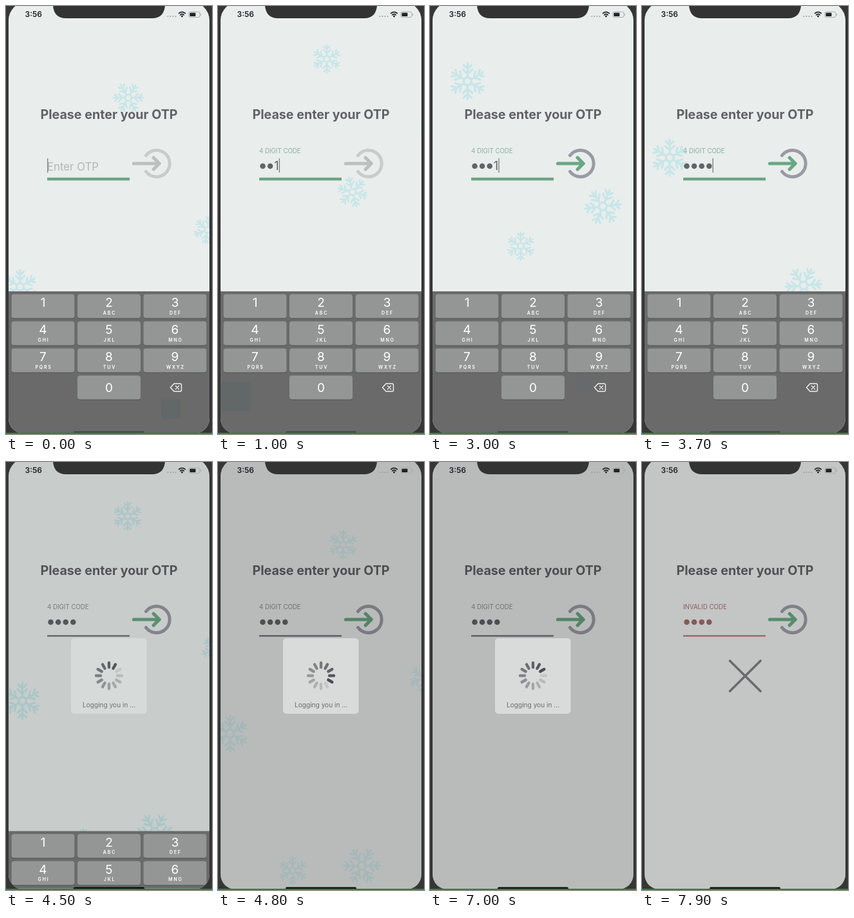
Animation of 320x663 px, one loop 8 s. Source, as an HTML page:

```html
<!DOCTYPE html>
<html lang="en">
<head>
<meta charset="utf-8">
<title>OTP login</title>
<style>
  html, body { margin: 0; width: 100%; height: 100%; overflow: hidden; background: #363636; }
  svg { display: block; width: 320px; height: 663px; }
  text { font-family: Inter, Roboto, sans-serif; }
  .mid { text-anchor: middle; }
  .line { fill: none; stroke-linecap: round; stroke-linejoin: round; }
</style>
</head>
<body>
<svg viewBox="0 0 320 663">
  <defs>
    <clipPath id="screen">
      <path d="M4 22A28 28 0 0 1 32 -6H288A28 28 0 0 1 316 22V639A23 23 0 0 1 293 662H27A23 23 0 0 1 4 639Z"/>
    </clipPath>
    <g id="arm"><path d="M0-5V-23M-5-21L0-16L5-21M-6-15L0-9.5L6-15"/></g>
    <g id="flake" class="line" stroke="#c7e6e8" stroke-width="2.7"></g>
  </defs>
  <rect width="320" height="663" fill="#363636"/>
  <g clip-path="url(#screen)">
    <rect y="-6" width="320" height="669" fill="#e9edec"/>
    <g id="flakes"></g>

    <text class="mid" x="160" y="175" font-size="19.7" font-weight="700" fill="#606163">Please enter your OTP</text>
    <text id="label" x="64"></text>
    <rect id="underline" x="64" width="128"/>
    <g id="dots"></g>
    <text id="digit" y="254" font-size="18" fill="#626365">1</text>
    <rect id="cursor" y="236" width="1.4" height="22" fill="#7d8583"/>
    <g class="line">
      <path id="ring" d="M217.5 231.5A20.5 20.5 0 1 1 217.5 256.5" stroke-width="5"/>
      <path id="arrow" d="M198.5 244H238M229.2 235L238.2 244L229.2 253" stroke-width="5.2"/>
    </g>

    <rect id="dim" width="320" height="663"/>
    <g id="panel">
      <rect x="101" y="273" width="117.5" height="117" rx="5" fill="#d8dbda"/>
      <g id="spinner" class="line" stroke="#4b4e50" stroke-width="4.4"></g>
      <text class="mid" x="160" y="379.5" font-size="10.15" fill="#6a6d6e">Logging you in ...</text>
    </g>
    <path id="cross" class="line" d="M136.5 308L184 355M184 308L136.5 355" stroke="#686b6c" stroke-width="3.6"/>

    <g id="keyboard">
      <rect y="442" width="320" height="226" fill="#6a6a6b"/>
      <g id="shadows"></g>
      <g id="keys"></g>
      <g class="line" stroke="#f2f2f2" stroke-width="1.4">
        <path d="M255.5 591L261 585H270.5Q272.5 585 272.5 587V595Q272.5 597 270.5 597H261Z"/>
        <path d="M263.5 588.5L268.5 593.5M268.5 588.5L263.5 593.5"/>
      </g>
    </g>
    <rect id="home" x="105" y="658.5" width="110" height="5" rx="2"/>

    <g fill="#202224">
      <text x="29.5" y="17" font-size="12" font-weight="600">3:56</text>
      <g fill="#9b9e9e">
        <circle cx="251.5" cy="16" r="1"/><circle cx="255.5" cy="16" r="1"/>
        <circle cx="259.5" cy="16" r="1"/><circle cx="263.5" cy="16" r="1"/>
      </g>
      <g class="line" stroke="#202224" stroke-width="1.7">
        <path d="M268.5 11.3Q273.5 7.3 278.5 11.3M270.7 13.8Q273.5 11.5 276.3 13.8"/>
      </g>
      <circle cx="273.5" cy="16" r="1.4"/>
      <rect x="284" y="9" width="17" height="8.5" rx="2.3" fill="none" stroke="#a9acac"/>
      <path d="M302.5 11.8V14.8" stroke="#a9acac"/>
      <rect x="285.5" y="10.5" width="9" height="5.5" rx="1"/>
    </g>
  </g>
  <path d="M73 0Q75 19 93 19H227Q245 19 247 0Z" fill="#333"/>
  <rect y="661" width="320" height="2" fill="#1f8f21"/>
</svg>
<script>
const LOOP = 8000, STEP = 100;
const SVG = "http://www.w3.org/2000/svg";
const $ = id => document.getElementById(id);

function set(el, attrs) {
  for (const name in attrs) el.setAttribute(name, attrs[name]);
  return el;
}
function add(parent, tag, attrs, text) {
  const el = set(document.createElementNS(SVG, tag), attrs);
  if (text) el.textContent = text;
  return parent.appendChild(el);
}
const ramp = (v, from, to) => Math.max(0, Math.min(1, (v - from) / (to - from)));
const mix = (a, b, k) => a + (b - a) * k;
const smooth = k => k * k * (3 - 2 * k);

// Flakes: time, x, y, px/s across and down, radius, angle, degrees/s
const FLAKES = [
  [0, 190, 142, 19, 146, 24, 30, 15],
  [0, 313, 347, 2, 150, 22, 10, 8],
  [0, 22, 435, 6, 170, 27, 0, 4],
  [0, 256, 624, 0, 165, 18, 0, 0],
  [1000, 169, 82, -14, 145, 22.5, 0, 0],
  [1000, 335, 190, 0, 150, 22, 0, 0],
  [2300, 286, 188, -25, 175, 29, 20, 4],
  [3700, 43, 235, -22, 169, 29, 0, 0],
  [4500, 189, 84, 18, 147, 23, 0, 5],
  [4500, 326, 290, -20, 150, 23, 10, 0]
];

for (let i = 0; i < 6; i++) add($("flake"), "use", { href: "#arm", transform: `rotate(${i * 60})` });
add($("flake"), "circle", { r: 5 });

const flakes = FLAKES.map(spec => ({
  spec,
  shape: add($("flakes"), "use", { href: "#flake" }),
  shade: add($("shadows"), "rect", { fill: "#526360", rx: 3 })
}));

const dots = [0, 1, 2, 3].map(i => add($("dots"), "circle", { cx: 69.5 + i * 11.6, cy: 248, r: 4.3 }));

const spokes = Array.from({ length: 12 }, (_, i) =>
  add($("spinner"), "path", { d: "M160 318V311", transform: `rotate(${i * 30} 160 331)` }));

["1", "2ABC", "3DEF", "4GHI", "5JKL", "6MNO", "7PQRS", "8TUV", "9WXYZ", "0"].forEach((key, i) => {
  const col = i === 9 ? 1 : i % 3, row = Math.floor(i / 3);
  const x = 8.5 + col * 102.5, y = 446.5 + row * 42;
  const keys = $("keys"), mid = x + 49;
  add(keys, "rect", { x, y: y + 1, width: 98, height: 37, rx: 4, fill: "#505152" });
  add(keys, "rect", { x, y, width: 98, height: 37, rx: 4, fill: "#949696" });
  add(keys, "text", { class: "mid", x: mid, y: y + (key === "0" ? 25 : 19.5), "font-size": 19, fill: "#fff" }, key[0]);
  add(keys, "text", {
    class: "mid", x: mid + 1, y: y + 31, "font-size": 7, "font-weight": 600,
    "letter-spacing": 1.8, fill: "#fff"
  }, key.slice(1));
});

const TYPED = [300, 500, 800, 1700];
const MASKED = 3100, SUBMIT = 4300, FAIL = 7300;

function drawFlakes(t) {
  const fade = 1 - ramp(t, 4500, 5400);
  for (const { spec, shape, shade } of flakes) {
    const [t0, x0, y0, vx, vy, r, angle, spin] = spec;
    const s = (t - t0) / 1000;
    const x = x0 + vx * s, y = y0 + vy * s;
    set(shape, {
      transform: `translate(${x} ${y}) rotate(${angle + spin * s}) scale(${r / 24})`,
      opacity: fade * ramp(y, 15, 60)
    });
    set(shade, {
      x: x - r * 0.85, y: y - r * 0.85, width: r * 1.7, height: r * 1.7,
      opacity: t < SUBMIT ? 0.3 * ramp(y, 570, 600) : 0
    });
  }
}

function drawField(t) {
  const count = TYPED.filter(at => t >= at).length;
  const focused = t < SUBMIT, failed = t >= FAIL;
  const plain = count > 0 && t < MASKED;
  const hidden = plain ? count - 1 : count;
  const ink = failed ? "#a16a6a" : "#636466";

  dots.forEach((dot, i) => set(dot, { fill: ink, opacity: i < hidden ? 1 : 0 }));
  set($("digit"), { x: 64 + hidden * 11.6, opacity: plain ? 1 : 0 });

  const last = count ? TYPED[count - 1] : 0;
  const caret = plain ? 71.5 + hidden * 11.6 : hidden ? 109.5 : 64;
  set($("cursor"), { x: caret, opacity: focused && (t - last) % 1000 < 700 ? 1 : 0 });

  const lift = smooth(ramp(t, 200, 500));
  const label = $("label");
  label.textContent = failed ? "INVALID CODE" : t < 300 ? "Enter OTP" : "4 DIGIT CODE";
  set(label, {
    y: mix(255, 227.5, lift),
    "font-size": mix(16.8, 9.7, lift),
    fill: failed ? "#a46e6e" : !focused ? "#8a8e8e" : lift < 0.5 ? "#b2b7b6" : "#88b09d"
  });
  set($("underline"), {
    y: focused ? 265.8 : 268.3,
    height: focused ? 4.5 : 2.2,
    fill: failed ? "#b17371" : focused ? "#6aa583" : "#696c72"
  });

  const ready = count === 4;
  set($("ring"), { stroke: ready ? "#9a9aa3" : "#c8cccb" });
  set($("arrow"), { stroke: ready ? "#6aa783" : "#bbc0be" });
}

function drawOverlay(t) {
  const shown = ramp(t, SUBMIT, 4600);
  const gone = ramp(t, FAIL, 7500);
  set($("dim"), { opacity: shown * mix(0.21, 0.165, gone), fill: "#000" });
  set($("panel"), { opacity: Math.min(1, shown * 1.4) * (1 - gone) });

  const head = Math.floor((t - 4400) / STEP);
  spokes.forEach((spoke, i) => {
    const age = ((head - i) % 12 + 12) % 12;
    set(spoke, { opacity: mix(1, 0.15, age / 11) });
  });

  const size = smooth(ramp(t, 7400, 7700));
  set($("cross"), {
    opacity: size,
    transform: `translate(160 331.5) scale(${mix(0.5, 1, size)}) translate(-160 -331.5)`
  });
}

function drawKeyboard(t) {
  const slide = ramp(t, SUBMIT, 4650);
  set($("keyboard"), { transform: `translate(0 ${227 * slide})` });
  set($("home"), { fill: t < SUBMIT ? "#49494a" : "#111" });
}

function frame() {
  const t = Math.floor(performance.now() % LOOP / STEP) * STEP;
  drawFlakes(t);
  drawField(t);
  drawOverlay(t);
  drawKeyboard(t);
  requestAnimationFrame(frame);
}
frame();
</script>
</body>
</html>
```
